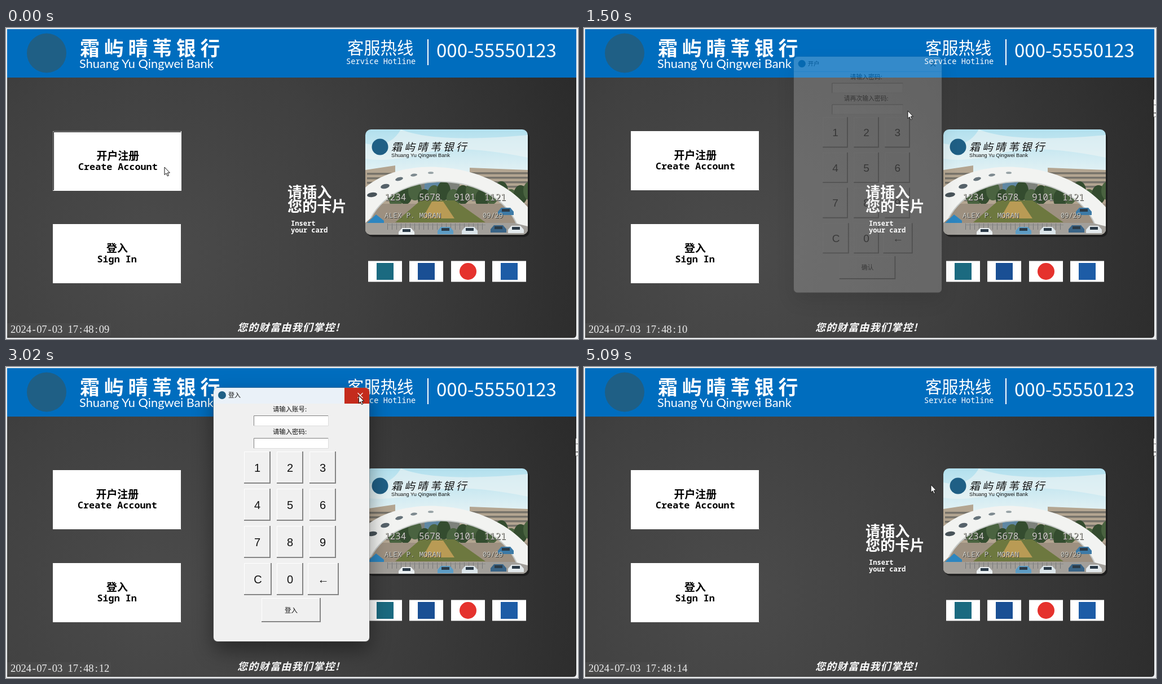
An HTML page that plays this animation: 1014 px wide and 552 px high, repeating every 5.16 s.

```html
<!DOCTYPE html>
<html lang="zh-CN">
<head>
<meta charset="utf-8">
<title>ATM</title>
<style>
html, body { margin: 0; width: 100%; height: 100%; overflow: hidden; background: #f0f0f0; }
svg { position: absolute; left: 0; top: 0; display: block; }
text { white-space: pre; }
.cjk { font-family: "Noto Sans CJK SC", "Noto Sans CJK", sans-serif; }
.mono { font-family: "Noto Sans Mono", "DejaVu Sans Mono", monospace; }
.arial { font-family: "Liberation Sans", Arial, sans-serif; }
.lato { font-family: Lato, "Open Sans", sans-serif; }
.serif { font-family: "Liberation Serif", serif; }
.b { font-weight: 700; }
.i { font-style: italic; }
.mid { text-anchor: middle; }
.wide { letter-spacing: .22em; }
.win { position: absolute; left: 0; top: 0; width: 276px; transform-origin: 0 0; visibility: hidden;
  border-radius: 7px; overflow: hidden; box-shadow: 0 16px 36px rgba(0,0,0,.42), 0 0 0 1px rgba(130,130,130,.4); }
</style>
</head>
<body>
<svg id="stage" width="1014" height="552" viewBox="0 0 1014 552"></svg>
<div id="account" class="win"></div>
<div id="login" class="win"></div>
<svg id="pointer" width="20" height="24" viewBox="-2 -2 20 24">
  <path d="M0 0V13.6L3.1 10.8L5.2 15.8L7.4 14.9L5.3 10H9.4Z" fill="#fff" stroke="#111" stroke-width="1"/>
</svg>
<script>
const LOOP = 5160, FIRST = 130, STEP = 68.85;
const BLUE = '#006dbe', SEAL = '#1f5f85';
const $ = id => document.getElementById(id);

const text = (x, y, size, fill, cls, s, extra = '') =>
  `<text x="${x}" y="${y}" font-size="${size}" fill="${fill}" class="${cls}" ${extra}>${s}</text>`;
const rect = (x, y, w, h, fill, extra = '') =>
  `<rect x="${x}" y="${y}" width="${w}" height="${h}" fill="${fill}" ${extra}/>`;
const disc = (x, y, r, fill) => `<circle cx="${x}" cy="${y}" r="${r}" fill="${fill}"/>`;
const path = (d, fill, extra = '') => `<path d="${d}" fill="${fill}" ${extra}/>`;
const oval = (x, y, rx, ry, fill, turn = 0) =>
  `<ellipse cx="${x}" cy="${y}" rx="${rx}" ry="${ry}" fill="${fill}" transform="rotate(${turn} ${x} ${y})"/>`;

function header() {
  return rect(2, 2, 1009, 86, BLUE) + disc(72, 44.5, 35, SEAL) +
    text(131, 48.5, 35, '#fff', 'cjk b wide', '霜屿晴苇银行') +
    text(130, 71, 21.8, '#fff', 'lato', 'Shuang Yu Qingwei Bank') +
    text(605, 46, 29.3, '#fff', 'cjk', '客服热线') +
    text(603, 64, 13.7, '#fff', 'mono', 'Service Hotline') +
    rect(747, 20, 2, 46, '#fff') +
    text(763, 52, 33, '#fff', 'cjk', '000-55550123');
}

function emboss(x, y, size, s) {
  return text(x + 1, y + 1, size, '#3a3a38', 'mono', s) + text(x, y, size, '#cfcfc8', 'mono', s);
}

function scene() {
  let s = rect(637, 180, 288, 187, 'url(#sky)');
  s += path('M700 180Q760 205 925 190V230Q800 205 740 222T637 232V205Q680 215 700 180Z', '#eef6f6', 'opacity=".6"');
  // Buildings and trees
  s += path('M637 252L690 244V258H822V248L925 252V330H637Z', '#b3a591');
  for (let k = 0; k < 5; k++)
    s += rect(640, 257 + k * 8, 60, 3.5, '#77736a') + rect(822, 256 + k * 8, 103, 3.5, '#77736a');
  s += rect(722, 256, 82, 46, '#7d817b') + rect(742, 263, 38, 34, '#5f87a3');
  for (let k = 0; k < 18; k++)
    s += oval(640 + k * 17, 303 - (k % 3) * 7, 12, 17, k % 2 ? '#4a6340' : '#344c2f');
  // Forecourt
  s += rect(637, 312, 288, 55, '#9d9080');
  s += path('M735 306H795L850 345H690Z', '#6d783f') + path('M755 308H775L795 338H738Z', '#b99b55');
  s += path('M637 346H925V367H637Z', '#a29f9a');
  s += path('M637 283C700 228 850 232 925 318V352L905 347C862 254 696 246 647 337L637 346Z', '#f2f3f1');
  s += path('M905 347C862 254 696 246 647 337', 'none', 'stroke="#c6cac8" stroke-width="2"');
  s += oval(649, 296, 9, 4, '#49545a', -8) + oval(672, 281, 8, 4, '#56626a', -14) +
    oval(697, 268, 7, 3, '#66737a', -14) + oval(723, 261, 6, 2.4, '#7d898f', -8) + oval(753, 257, 5, 2, '#98a3a6');
  s += path('M640 346L656 331L670 342V346Z', '#2d86c0');
  for (let x = 676; x < 850; x += 8) s += rect(x, 347, 1, 11, '#777');
  s += rect(676, 349, 174, 1, '#888');
  for (const [x, y, c] of [[710, 362, '#e9eef0'], [779, 360, '#5d9cc4'], [822, 360, '#dbe5ea'], [873, 357, '#3a6486'], [904, 358, '#e4eaed'], [886, 326, '#3d7aa6']])
    s += path(`M${x - 14} ${y + 6}V${y}L${x - 8} ${y - 7}H${x + 8}L${x + 14} ${y}V${y + 6}Z`, c) +
      rect(x - 7, y - 5, 14, 5, '#2c3b48');
  return s;
}

function card() {
  return rect(640, 184, 288, 187, '#111', 'rx="10" opacity=".6"') +
    `<g clip-path="url(#cardClip)">${scene()}</g>` +
    disc(663, 211, 14.5, SEAL) +
    text(683, 218, 18.8, '#111', 'cjk i wide', '霜屿晴苇银行') +
    text(683, 229, 9.2, '#111', 'arial', 'Shuang Yu Qingwei Bank') +
    ['1234', '5678', '9101', '1121'].map((n, k) => emboss([671, 732, 794, 848][k], 306, 16, n)).join('') +
    emboss(671, 337, 12.8, 'ALEX P. MORAN') + emboss(845, 337, 12, '09/29');
}

function payMarks() {
  const tile = x => rect(x, 413.5, 60, 37, '#fff');
  return [642, 715, 789, 862].map(tile).join('') +
    rect(657, 417, 30, 30, '#1b6a80') + rect(730, 417, 30, 30, '#1a4f94') +
    disc(819, 432, 15, '#e5322d') + rect(877, 417, 30, 30, '#1d5ca6');
}

function bigButton(id, y, h, cn, cnX, en, enX) {
  const r = 311, b = y + h;
  return `<g id="${id}">` + rect(83, y, 228, h, '#fff', 'class="face"') +
    path(`M84.5 ${b}V${y + 1.5}H${r}`, 'none', 'class="tl"') +
    path(`M83.5 ${b}V${y + .5}H${r}`, 'none', 'class="rim"') +
    path(`M83 ${b - .5}H${r - .5}V${y}`, 'none', 'class="br"') +
    '<g class="cap">' + text(cnX, y + 50, 18.9, '#000', 'cjk b', cn) +
    text(enX, y + 68, 16.75, '#000', 'mono b', en) + '</g></g>';
}

$('stage').innerHTML = `<defs>
  <radialGradient id="wall" gradientUnits="userSpaceOnUse" cx="270" cy="400" r="800">
    <stop offset="0" stop-color="#4b4b4b"/><stop offset=".45" stop-color="#404040"/><stop offset="1" stop-color="#2b2b2b"/>
  </radialGradient>
  <linearGradient id="sky" x1="0" y1="0" x2="0" y2="1">
    <stop offset="0" stop-color="#b2e0ee"/><stop offset=".4" stop-color="#e2f1f4"/>
  </linearGradient>
  <clipPath id="cardClip"><rect x="637" y="180" width="288" height="187" rx="10"/></clipPath></defs>` +
  rect(0, 0, 1014, 552, '#eceef0') + path('M2 2H1011V544Q1011 550 1005 550H2Z', 'url(#wall)') + header() +
  bigButton('create', 183, 106, '开户注册', 159.5, 'Create Account', 127) +
  bigButton('signin', 348, 106, '登入', 178, 'Sign In', 161.5) +
  text(499, 301, 26.2, '#fff', 'cjk b', '请插入') + text(499, 326, 26.2, '#fff', 'cjk b', '您的卡片') +
  text(505, 351, 12.1, '#fff', 'mono b', 'Insert') + text(505, 363, 12.1, '#fff', 'mono b', 'your card') +
  card() + payMarks() +
  text(410, 538, 18, '#fff', 'cjk b i', '您的财富由我们掌控!', 'letter-spacing="1.3"') +
  rect(2, 524, 184, 22, '#4a4a4a') +
  text(Array.from({ length: 19 }, (_, k) => (12.7 + k * 9.22).toFixed(2)).join(' '), 541, 18.6, '#ececec', 'serif mid', '', 'id="clock"') +
  '<g id="edge">' + rect(1010, 127, 4, 31, '#f7f7f7') + rect(1010, 136, 4, 1, '#777') +
  rect(1010, 150, 4, 1.5, '#555') + rect(1010, 157, 4, 1, '#888') + '</g>';

// Dialogs
function key(x, y, w, h, label, cls = 'arial', size = 20) {
  const r = x + w, b = y + h;
  return rect(x, y, w, h, '#f0f0f0') +
    path(`M${x + .5} ${b}V${y + .5}H${r}`, 'none', 'stroke="#fff"') +
    path(`M${x} ${b - 1}H${r - 1}V${y}`, 'none', 'stroke="#858585" stroke-width="2"') +
    text(x + w / 2, y + h / 2 + size * .36, size, '#111', cls + ' mid', label);
}
function field(y, label) {
  return text(135, y - 7, 11.4, '#111', 'cjk mid', label) + rect(71, y, 133, 19, '#fff') +
    path(`M71.5 ${y + 19}V${y + .5}H204`, 'none', 'stroke="#808080"') +
    path(`M71 ${y + 18.5}H203.5V${y}`, 'none', 'stroke="#dcdcdc"');
}
function keypad() {
  let s = '';
  for (let k = 0; k < 9; k++)
    s += key(54 + (k % 3) * 58, 113 + Math.floor(k / 3) * 66, 47, 57, k + 1);
  return s + key(54, 311, 49, 57, 'C') + key(112, 311, 47, 57, '0') + key(167, 311, 55, 57, '←');
}
function dialog(id, h, title, first, second, ok) {
  const el = $(id);
  el.style.height = h + 'px';
  el.innerHTML = `<svg width="276" height="${h}" viewBox="0 0 276 ${h}">` +
    rect(0, 28, 276, h - 28, '#f0f0f0', 'class="body"') + rect(0, 0, 276, 28, '#eaf1f8') +
    disc(15, 13, 7, SEAL) + text(26, 17, 11, '#111', 'cjk', title) +
    rect(232, 0, 44, 28, '#c42b1c', 'class="hot"') +
    path('M255.5 9L264.5 18M264.5 9L255.5 18', 'none', 'class="x" stroke="#111" stroke-width="1.1"') +
    '<g class="bare">' + rect(163, 13, 9, 1.2, '#111') +
    path('M206 9.5H214V17.5H206Z', 'none', 'stroke="#aab0b6"') + '</g>' +
    '<g class="full">' + field(49, first) + field(89, second) + keypad() +
    key(85, 373, 105, 43, ok, 'cjk', 11.4) + '</g></svg>';
}
dialog('account', 441, '开户', '请输入密码:', '请再次输入密码:', '确认');
dialog('login', 450, '登入', '请输入账号:', '请输入密码:', '登入');

// Rows: time, x, y
const TIP = [
  [0, 281, 247], [200, 281, 247], [340, 276, 247], [612, 276, 247], [750, 372, 205], [1000, 560, 100],
  [1160, 620, 58], [1310, 624, 50], [1390, 618, 66], [1507, 574, 147], [1640, 430, 290], [1850, 245, 392],
  [1930, 231, 397], [2060, 260, 380], [2333, 598, 157], [2650, 620, 92], [2850, 626, 54], [3020, 626, 50],
  [3120, 590, 96], [3300, 380, 212], [3440, 244, 264], [3710, 243, 264], [3850, 320, 230], [4060, 530, 120],
  [4260, 622, 54], [4390, 625, 52], [4467, 623, 72], [4600, 614, 97], [5087, 615, 209]];

// Rows: time, left, width, top, opacity
const opening = t => [[t - 69, 376, 236, 57, 0], [t, 374, 242, 59, .25], [t + 69, 371, 262, 49, .6],
  [t + 138, 369, 274, 42, .86], [t + 206, 368, 276, 41, 1]];
const closing = t => [[t - 69, 368, 276, 41, 1], [t, 369, 272, 44, .68], [t + 69, 372, 262, 51, .22], [t + 138, 374, 256, 55, 0]];
const SHOWS = [
  { id: 'account', poses: [...opening(474), ...closing(1438)], ready: 740, glass: true, lift: 0 },
  { id: 'login', poses: [...opening(2020), ...closing(3094)], ready: 2240, lift: 4 },
  { id: 'account', poses: [...opening(3710), ...closing(4467)], ready: 3910, lift: 0 }];

function at(rows, t) {
  if (t <= rows[0][0]) return rows[0].slice(1);
  for (let k = 1; k < rows.length; k++) {
    const a = rows[k - 1], b = rows[k];
    if (t <= b[0]) {
      const u = (t - a[0]) / (b[0] - a[0]);
      return a.slice(1).map((v, j) => v + (b[j + 1] - v) * u);
    }
  }
  return rows[rows.length - 1].slice(1);
}
const within = (t, a, b) => t >= a && t < b;

function setButton(id, down, active) {
  const g = $(id), q = c => g.querySelector(c);
  const face = active ? BLUE : '#fff';
  q('.face').setAttribute('fill', face);
  q('.rim').setAttribute('stroke', down ? '#8c8c8c' : '#fff');
  q('.tl').setAttribute('stroke', down ? '#222' : face);
  q('.br').setAttribute('stroke', down ? (active ? '#7fb9ea' : '#fff') : '#4a4a4a');
  q('.cap').setAttribute('transform', down ? 'translate(1 1)' : '');
}

function setDialog(show, t, tip) {
  const el = $(show.id), q = c => el.querySelector(c);
  const [x, w, y, alpha] = at(show.poses, t);
  if (alpha <= 0) return;
  const ready = t >= show.ready, vis = on => on ? 'inherit' : 'hidden';
  const hot = ready && alpha === 1 && tip[0] > 600 && tip[1] < 69 - show.lift;
  el.style.visibility = 'visible';
  el.style.opacity = alpha;
  el.style.transform = `translate(${x}px, ${y - show.lift}px) scale(${w / 276})`;
  q('.body').style.visibility = vis(ready || !show.glass);
  q('.full').style.visibility = vis(ready);
  q('.bare').style.visibility = vis(!ready);
  q('.hot').style.visibility = vis(hot);
  q('.x').setAttribute('stroke', hot ? '#fff' : '#111');
  q('.x').setAttribute('transform', ready ? '' : 'translate(-7 0)');
}

function draw(ms) {
  const t = ms < FIRST ? 0 : FIRST + Math.floor((ms - FIRST + 10) / STEP) * STEP;
  const tip = at(TIP, t);
  setButton('create', t < 740 || within(t, 3500, 3910), within(t, 265, 740) || within(t, 3560, 3910));
  setButton('signin', within(t, 1910, 2220), within(t, 1910, 2220));
  $('account').style.visibility = $('login').style.visibility = 'hidden';
  SHOWS.forEach(s => setDialog(s, t, tip));
  $('pointer').style.transform = `translate(${tip[0] - 2}px, ${tip[1] - 2}px)`;
  $('clock').textContent = '2024-07-03 17:48:' + String(9 + Math.floor((t + 260) / 1000)).padStart(2, '0');
  $('edge').style.visibility = t < 265 ? 'hidden' : 'visible';
}

const start = performance.now();
function tick() {
  draw((performance.now() - start) % LOOP);
  requestAnimationFrame(tick);
}
draw(0);
requestAnimationFrame(tick);
</script>
</body>
</html>
```
